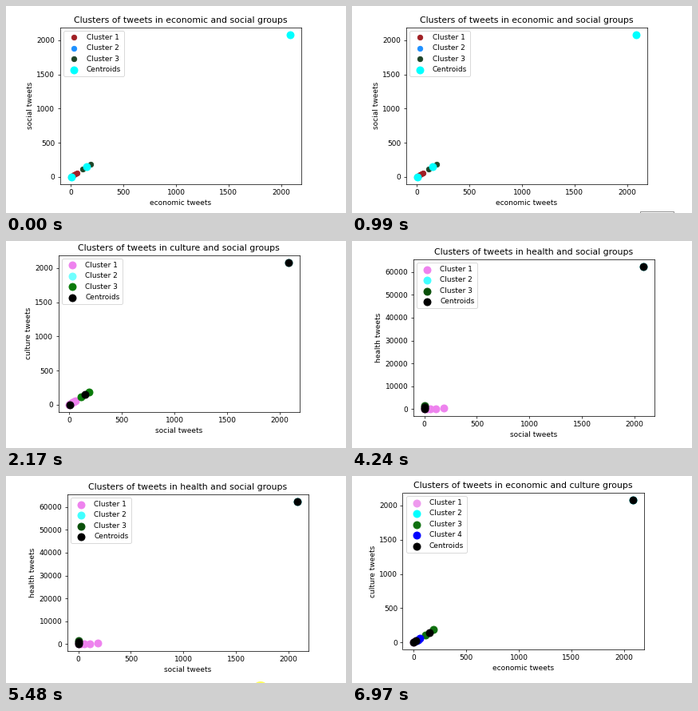
A matplotlib script that plays this animation: 426x259 px, repeating every 8 s.

```python
import matplotlib.pyplot as plt
from matplotlib.animation import FuncAnimation
from matplotlib.lines import Line2D
from matplotlib.patches import Circle, Rectangle

W, H, DPI = 426, 259, 65
LOOP, STEP = 8000, 40
AXES_W, AXES_H = 302.3, 196.3  # plot area in pixels

plt.rcParams["font.family"] = "DejaVu Sans"
fig = plt.figure(figsize=(W / DPI, H / DPI), dpi=DPI, facecolor="white")


def diagonal(*values):
    return [(v, v) for v in values]


def plot(left, bottom, x_name, y_name, clusters, centroids, size=100):
    """Scatter plot placed by its lower left corner, measured from the top."""
    ax = fig.add_axes([left / W, 1 - bottom / H, AXES_W / W, AXES_H / H])
    for i, (color, points) in enumerate(clusters, 1):
        ax.scatter(*zip(*points), s=size, color=color, label=f"Cluster {i}")
    color, points = centroids
    ax.scatter(*zip(*points), s=100, color=color, label="Centroids")
    ax.set_xlabel(f"{x_name} tweets")
    ax.set_ylabel(f"{y_name} tweets")
    first, second = (x_name, y_name) if x_name == "economic" else (y_name, x_name)
    ax.set_title(f"Clusters of tweets in {first} and {second} groups")
    ax.legend(loc="upper left")
    return ax


SMALL = diagonal(0, 8, 18, 30, 42, 56)
MEDIUM = diagonal(112, 187)
FAR = diagonal(2085)
MEANS = diagonal(3, 148, 2085)
HEALTH_FAR = [(2085, 62500)]
HEALTH_TOP = [(0, 1300)]

# Each plot with the time it first appears.
scenes = [
    (0, plot(67.5, 222.9, "economic", "social",
             [("#a01f24", SMALL), ("dodgerblue", FAR), ("#1f4528", MEDIUM)],
             ("cyan", MEANS), size=50)),
    (2170, plot(65.6, 213.9, "social", "culture",
                [("violet", SMALL), ("#6fffff", FAR), ("#0a7a0a", MEDIUM)],
                ("black", MEANS))),
    (4240, plot(76.8, 219.1, "social", "health",
                [("violet", [(0, 0), (25, 50), (56, 100), (112, 100), (185, 300)]),
                 ("#40ffff", HEALTH_FAR), ("#0a500a", HEALTH_TOP)],
                ("black", [(0, 0), (2, 900)] + HEALTH_FAR))),
    (5630, plot(71.2, 214.5, "economic", "health",
                [("#e699e6", [(20, 50), (60, 100)]), ("cyan", HEALTH_FAR),
                 ("#005800", HEALTH_TOP), ("blue", [(0, 0), (110, 100), (185, 300)])],
                ("black", [(3, 700), (14, 200)] + HEALTH_FAR))),
    (6970, plot(63.5, 217.1, "economic", "culture",
                [("#ee99ee", diagonal(0, 8)), ("cyan", FAR),
                 ("#0f700f", MEDIUM), ("blue", diagonal(30, 42, 56))],
                ("black", diagonal(0, 20, 148, 2085)))),
]

overlay = fig.add_axes([0, 0, 1, 1], zorder=5)
overlay.set(xlim=(0, W), ylim=(H, 0))
overlay.axis("off")
tooltip = overlay.add_patch(
    Rectangle((360.5, 256.5), 42, 20, fc="white", ec="#777777", lw=0.9))
page_edge = overlay.add_line(Line2D([0, W], [258.5, 258.5], color="#858585", lw=0.9))
highlight = overlay.add_patch(Circle((319, 267), 10, fc="#ffff5c", ec="none"))


def update(frame):
    t = (frame + 1) * STEP - 1
    current = max(i for i, (start, _) in enumerate(scenes) if start <= t)
    for i, (_, ax) in enumerate(scenes):
        ax.set_visible(i == current)
    tooltip.set_visible(830 <= t < 2170)
    tooltip.set_alpha(1 if t >= 990 else 0.7 if t >= 910 else 0.35)
    page_edge.set_visible(2170 <= t < 4240)
    highlight.set_visible(5480 <= t < 5630)
    return [ax for _, ax in scenes] + [tooltip, page_edge, highlight]


anim = FuncAnimation(fig, update, frames=LOOP // STEP, interval=STEP,
                     repeat=True, repeat_delay=0, blit=False)
plt.show()
```
